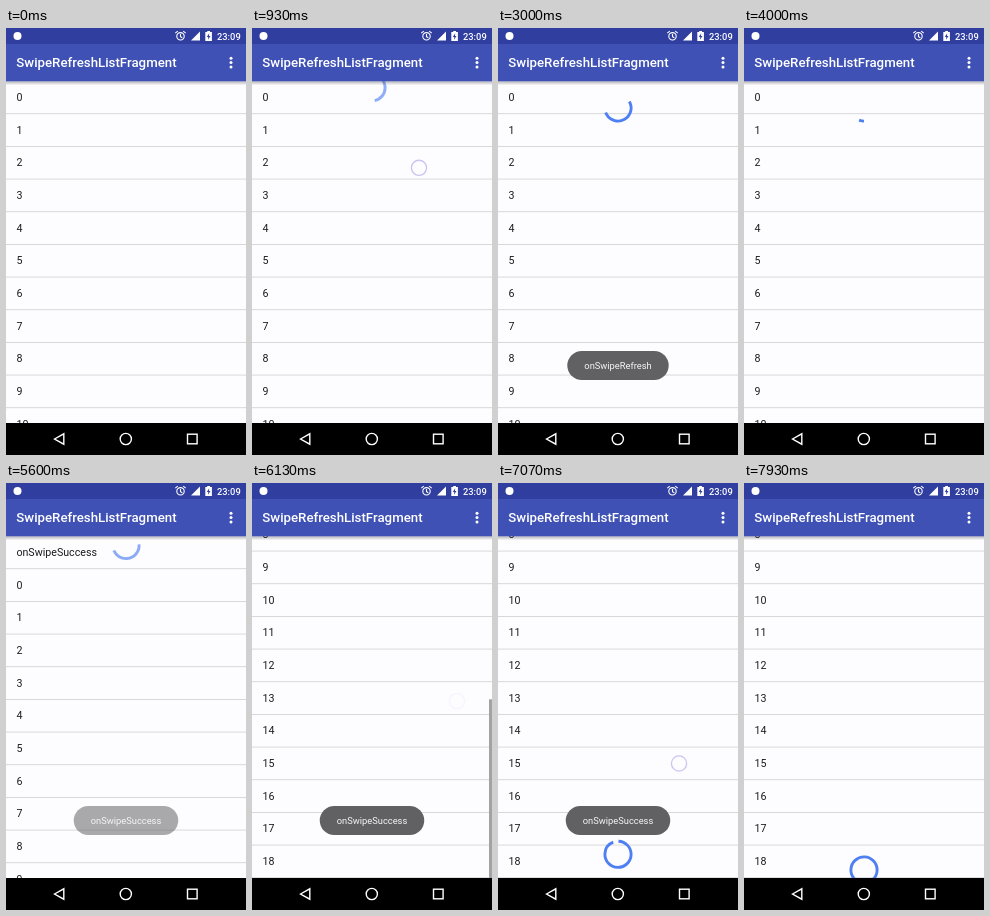
Animation, 240 px wide and 427 px high, one loop 8000 ms. Source, as an HTML page with a canvas:

```html
<!DOCTYPE html>
<html lang="en">
<head>
<meta charset="utf-8">
<title>Swipe refresh list</title>
<style>
  html, body { margin: 0; width: 100%; height: 100%; overflow: hidden; background: #000; }
  canvas { display: block; width: 240px; height: 427px; }
</style>
</head>
<body>
<canvas id="stage"></canvas>
<script>
const W = 240, H = 427, LOOP = 8000, FPS = 15;
const TOP = 160 / 3, BOTTOM = 395, VIEW = BOTTOM - TOP, ROW = 98 / 3;
const INSERTED = 5400;
const canvas = document.getElementById('stage');
const ctx = canvas.getContext('2d');
const scale = window.devicePixelRatio || 1;
canvas.width = W * scale;
canvas.height = H * scale;

const clamp = v => Math.min(1, Math.max(0, v));
const smooth = v => v * v * (3 - 2 * v);
const rad = deg => deg * Math.PI / 180;

// Linear interpolation through [time, value] points.
function track(t, ...points) {
  if (t <= points[0][0]) return points[0][1];
  for (let i = 1; i < points.length; i++) {
    const [t0, v0] = points[i - 1], [t1, v1] = points[i];
    if (t < t1) return v0 + (v1 - v0) * (t - t0) / (t1 - t0);
  }
  return points[points.length - 1][1];
}

function rect(x, y, w, h, color) {
  ctx.fillStyle = color;
  ctx.fillRect(x, y, w, h);
}

function text(str, x, y, size, color, weight = 400, align = 'left') {
  ctx.font = `${weight} ${size}px Roboto, sans-serif`;
  ctx.textAlign = align;
  ctx.fillStyle = color;
  ctx.fillText(str, x, y);
}

function dot(x, y, r) {
  ctx.beginPath();
  ctx.arc(x, y, r, 0, 7);
  ctx.fill();
}

function arc(x, y, r, start, sweep, width, color, alpha = 1) {
  ctx.globalAlpha = alpha;
  ctx.strokeStyle = color;
  ctx.lineWidth = width;
  ctx.beginPath();
  ctx.arc(x, y, r, rad(start), rad(start + sweep));
  ctx.stroke();
  ctx.globalAlpha = 1;
}

function poly(...points) {
  ctx.beginPath();
  points.forEach(([x, y]) => ctx.lineTo(x, y));
  ctx.closePath();
}

function drawList(t) {
  const scroll = track(t, [5700, 0], [5900, 130], [6120, 20 * ROW - VIEW]);
  const shift = t >= INSERTED ? 1 : 0;
  rect(0, TOP - 1, W, VIEW + 1, '#fdfcff');
  for (let i = 0; i < 19 + shift; i++) {
    const y = TOP + i * ROW - scroll;
    if (y < TOP - ROW || y > BOTTOM) continue;
    text(shift && !i ? 'onSwipeSuccess' : String(i - shift), 10.4, y + 19.8, 32 / 3, '#1c1c1e');
    rect(0, y + 32, W, 0.8, '#d0cfd3');
  }
  ctx.globalAlpha = track(t, [5700, 0], [5780, 1], [6400, 1], [6700, 0]);
  rect(237, TOP + scroll * VIEW / (20 * ROW), 3, VIEW * VIEW / (20 * ROW), '#a3a2a5');
  ctx.globalAlpha = 1;
}

function drawSpinner(y, start, sweep, alpha) {
  arc(120, y, 13.1, start, sweep, 2.9, '#4f80f3', alpha);
}

function drawTopSpinner(t) {
  if (t < 650 || t > 5800) return;
  const y = track(t, [650, 38], [1250, 84], [1400, 84], [1580, 80], [INSERTED, 80], [5800, 45]);
  const alpha = track(t, [650, 0.3], [1250, 1], [INSERTED, 1], [5800, 0.3]);
  if (t < 1600) {
    drawSpinner(y, -90, track(t, [650, 20], [1300, 360]), alpha);
    return;
  }
  const turns = (t - 4000) / 1332, cycle = Math.floor(turns), p = turns - cycle;
  const head = Math.sin(clamp(p * 2) * Math.PI / 2), tail = smooth(clamp(p * 2 - 1));
  const start = 90 + (t - 4000) * 0.242 + (cycle + tail) * 238;
  const sweep = t < 2668 ? 360 - 338 * smooth((t - 1600) / 1068) : 22 + 238 * (head - tail);
  drawSpinner(y, start, sweep, alpha);
}

function drawBottomSpinner(t) {
  if (t < 6650) return;
  const y = track(t, [6650, 410], [7070, 371], [7350, 362], [7550, 362], [7930, 387]);
  drawSpinner(y, -88, track(t, [6650, 60], [7070, 339], [7200, 360]), track(t, [6650, 0.3], [7000, 1]));
}

function drawTouch(t, from, to, xs, ys) {
  const alpha = track(t, [from, 0], [from + 70, 1], [to, 1], [to + 200, 0]);
  if (alpha) arc(track(t, ...xs), track(t, ...ys), 7.6, 0, 360, 1.3, '#cbc4f0', alpha);
}

function drawToast(t, start, label) {
  const alpha = track(t, [start, 0], [start + 300, 1], [start + 2160, 1], [start + 2490, 0]);
  if (!alpha) return;
  ctx.font = '400 9.33px Roboto, sans-serif';
  const width = ctx.measureText(label).width + 34;
  ctx.globalAlpha = alpha;
  ctx.fillStyle = '#616063';
  ctx.beginPath();
  ctx.roundRect(120 - width / 2, 323, width, 29, 14.5);
  ctx.fill();
  ctx.globalAlpha = 1;
  // Near-white text on a near-white list needs no fade of its own.
  text(label, 120, 341, 9.33, '#f6f6f6', 400, 'center');
}

function drawBars() {
  const shadow = ctx.createLinearGradient(0, TOP, 0, TOP + 4);
  shadow.addColorStop(0, 'rgba(0,0,0,.28)');
  shadow.addColorStop(1, 'rgba(0,0,0,0)');
  rect(0, TOP, W, 4, shadow);
  rect(0, 0, W, 16, '#303f9f');
  rect(0, 16, W, TOP - 16, '#3f51b5');
  text('SwipeRefreshListFragment', 10.3, 39.3, 13.25, '#fff', 500);
  ctx.fillStyle = '#fff';
  [30.2, 34.6, 39].forEach(y => dot(225, y, 1.5));

  // Status icons
  dot(11.5, 8, 4);
  arc(174.5, 8.3, 3.7, 0, 360, 1.1, '#fff');
  ctx.beginPath();
  ctx.moveTo(174.5, 6); ctx.lineTo(174.5, 8.6); ctx.lineTo(176.3, 9.7);
  ctx.moveTo(169.3, 5.2); ctx.lineTo(171.8, 3.1);
  ctx.moveTo(179.7, 5.2); ctx.lineTo(177.2, 3.1);
  ctx.stroke();
  poly([185, 12.5], [194, 12.5], [194, 3.5]);
  ctx.fill();
  rect(199.3, 4, 6.6, 9, '#fff');
  rect(201.2, 3, 2.8, 1, '#fff');
  ctx.fillStyle = '#303f9f';
  poly([203.2, 5.3], [200.8, 9], [202.3, 9], [202, 11.8], [204.5, 8], [203, 8]);
  ctx.fill();
  text('23:09', 211, 11.5, 9.33, '#fff', 500);

  // Navigation
  rect(0, BOTTOM, W, H - BOTTOM, '#000');
  arc(119.8, 411, 5.6, 0, 360, 1.4, '#fff');
  poly([48.5, 411], [57.8, 405.8], [57.8, 416.2]);
  ctx.stroke();
  ctx.strokeRect(181.5, 406.2, 9.6, 9.6);
}

function draw(t) {
  ctx.setTransform(scale, 0, 0, scale, 0, 0);
  drawList(t);
  drawTopSpinner(t);
  drawBottomSpinner(t);
  drawBars();
  drawToast(t, 1400, 'onSwipeRefresh');
  drawToast(t, 5440, 'onSwipeSuccess');
  drawTouch(t, 600, 1380, [[600, 164], [1380, 171]], [[600, 95], [1380, 200]]);
  drawTouch(t, 5650, 5960, [[5650, 198], [5960, 205]], [[5650, 350], [5960, 218]]);
  drawTouch(t, 6600, 7500, [[6600, 186], [7070, 181], [7500, 184]], [[6600, 345], [7070, 280], [7500, 215]]);
}

function tick() {
  const now = performance.now() % LOOP;
  const t = Math.floor((now + 5) * FPS / 1000) * 1000 / FPS;
  // The picture rests between these two moments.
  draw(t > 1934 && t < 2730 ? 1933 : t);
  requestAnimationFrame(tick);
}
tick();
</script>
</body>
</html>
```
